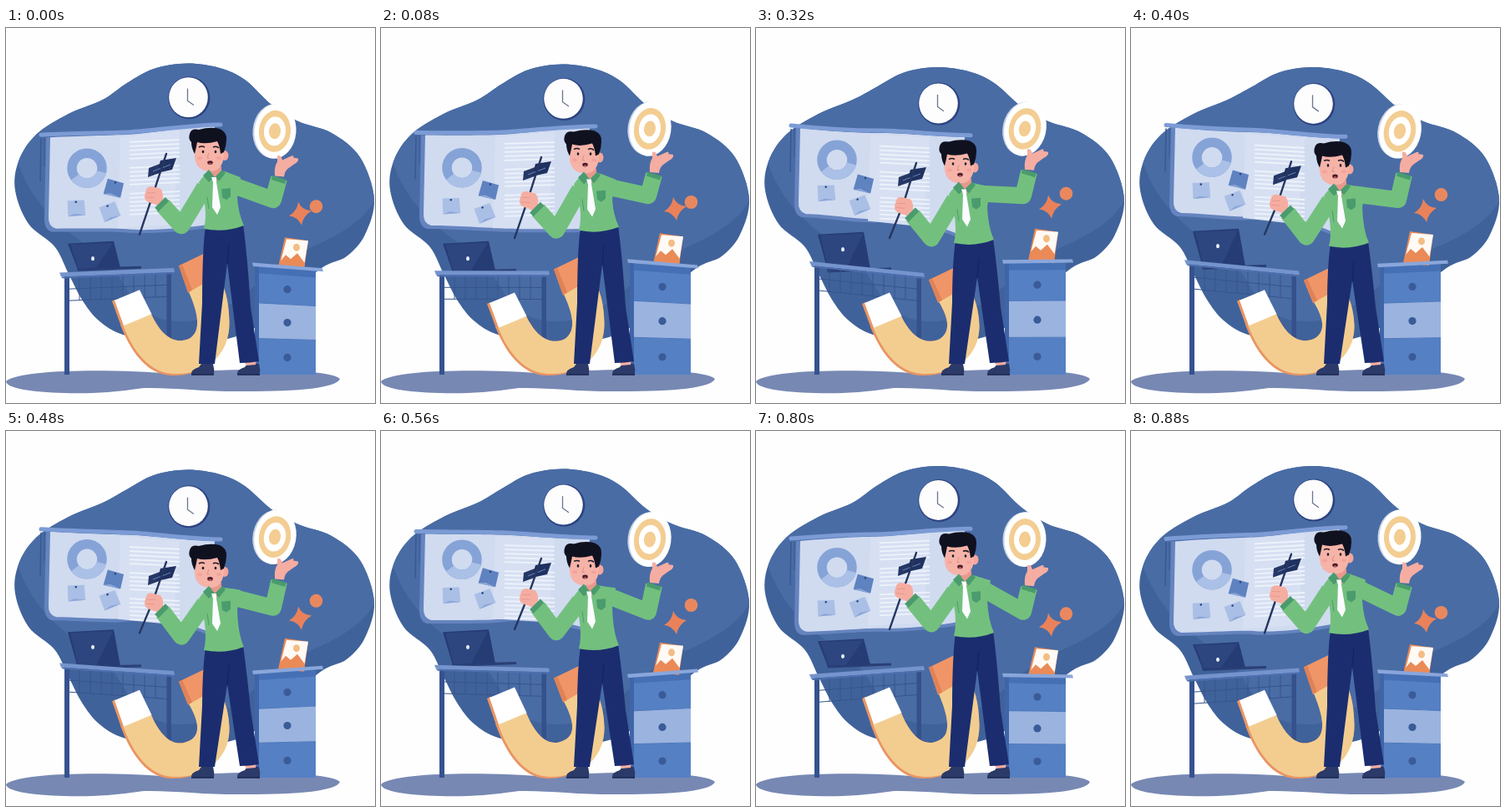
Recreate the animation shown at these times as an HTML page. Size 442x450 px, loop 0.96 s.

```html
<!DOCTYPE html>
<html lang="en">
<head>
<meta charset="utf-8">
<title>Presenter</title>
<style>
html, body { margin: 0; width: 100%; height: 100%; overflow: hidden; background: #fefefe; }
svg { display: block; width: 442px; height: 450px; }
</style>
</head>
<body>
<svg id="stage" viewBox="0 0 442 450" xmlns="http://www.w3.org/2000/svg"></svg>
<script>
const LOOP = 960, STEP = 80;
const stage = document.getElementById('stage');
let now = 0;

// Swing around `mid` that is largest at the time `peak`
const sway = (mid, amp, peak) => mid + amp * Math.cos(2 * Math.PI * (now - peak) / LOOP);
const r = n => Math.round(n * 100) / 100;
const lerp = (a, b, k) => a + (b - a) * k;

const path = (d, fill, extra = '') => `<path d="${d}" fill="${fill}" ${extra}/>`;
const poly = (pts, fill, extra = '') =>
  `<polygon points="${pts.map(p => p.map(r).join()).join(' ')}" fill="${fill}" ${extra}/>`;
const line = (pts, color, width, extra = '') =>
  `<polyline points="${pts.map(p => p.map(r).join()).join(' ')}" fill="none" stroke="${color}" stroke-width="${width}" ${extra}/>`;
const oval = (x, y, rx, ry, fill, extra = '') =>
  `<ellipse cx="${r(x)}" cy="${r(y)}" rx="${rx}" ry="${ry}" fill="${fill}" ${extra}/>`;
const move = (x, y, body, turn = 0) =>
  `<g transform="translate(${r(x)} ${r(y)}) rotate(${r(turn)})">${body}</g>`;
const round = 'stroke-linecap="round" stroke-linejoin="round"';

function smooth(pts) {
  const n = pts.length, at = i => pts[(i + n) % n];
  let d = `M${pts[0].map(r)}`;
  for (let i = 0; i < n; i++) {
    const [a, b, c, e] = [at(i - 1), at(i), at(i + 1), at(i + 2)];
    d += `C${[0, 1].map(k => r(b[k] + (c[k] - a[k]) / 6))} ${[0, 1].map(k => r(c[k] - (e[k] - b[k]) / 6))} ${c.map(r)}`;
  }
  return d + 'Z';
}

function backdrop() {
  const u = sway(0, 2.6, 380);
  const shape = smooth([
    [217, 44.5 + u], [256, 50 + u], [286, 64 + u], [318, 93 + u / 2], [350, 112], [390, 126],
    [424, 155], [441, 205], [430, 248], [408, 274], [378, 288], [335, 325], [298, 360],
    [250, 376], [190, 377], [140, 368], [111, 351], [91, 326], [75, 295], [58, 262],
    [27, 235], [11, 195], [15, 160], [36, 128], [75, 103], [116, 86], [145, 68 + u], [177, 51 + u]]);
  return `<clipPath id="blob"><path d="${shape}"/></clipPath>` +
    path(shape, '#40629a') +
    path('M0 0H442V206C425 238 385 255 350 270S270 350 215 352S150 320 130 290S38 240 12 155L0 150Z',
      '#496ca5', 'clip-path="url(#blob)"');
}

const shadow = () => path('M0 424C16 409 130 409 200 415C260 407 390 408 400 421C396 432 350 436 290 436' +
  'C240 437 200 431 165 432C125 438 95 439 70 438C30 437 0 432 0 424Z', '#7788b3');

function clock() {
  return move(218.5, sway(86.7, 4.2, 390),
    oval(0.8, 0.6, 25, 25.5, '#2c4280') + oval(0, 0, 23.3, 24, '#fdfdfe') +
    line([[-1, -10], [-1, 4], [6, 9]], '#6b7690', 1.3, round));
}

function target() {
  return move(322, sway(125.5, 6.5, 680),
    oval(-1.5, 0, 25, 32.5, '#c9d3e6') + oval(0.5, 0, 25, 33, '#fff') +
    oval(0, 0, 19, 25, '#f3cd92') + oval(0, 0, 13, 17.5, '#fff') + oval(0, 0, 7, 9.5, '#f3cd92'),
    sway(8, 5, 320));
}

function sparkles() {
  return move(353, sway(223.5, 11, 705),
      path('M-3 -14Q1 -4 13 -3Q3 3 1 14Q-4 4 -14 3Q-4 -3 -3 -14Z', '#e9825a')) +
    oval(371.5, sway(209, 10.3, 800), 7.8, 8, '#e9885f');
}

function note(x, y, turn, fill) {
  return move(x, y, poly([[-10, -9], [10, -9], [11, 9], [-10, 10]], fill) +
    poly([[-10, 10], [11, 9], [-2, 7]], '#8ba6d8') + oval(0, -7, 1.3, 1.3, '#2b4680'), turn);
}

function board() {
  const tl = sway(123, 6.5, 860), tr = sway(123, 7.5, 430);
  const tm = sway(123.5, 2.5, 60);
  const bl = sway(232, 10, 880), bm = sway(232, 11, 0), br = sway(238, 9, 270);
  const bend = (y0, y1, y2, x0, x2) =>
    `C${r(lerp(x0, x2, .22))} ${r(lerp(y0, y1, .8))} ${r(lerp(x0, x2, .4))} ${r(y1)} ${r(lerp(x0, x2, .5))} ${r(lerp(y1, (y0 + y2) / 2, .3))}` +
    `S${r(lerp(x0, x2, .85))} ${r(y2)} ${x2} ${r(y2)}`;
  const panel = (x, e) => `M${x} ${r(tl + 3)}` + bend(tl + 3, tm + 3, tr + 2, x, 250) +
    `L240 ${r(br + e)}` + bend(br + e, bm + e, bl + e, 240, x + 7) +
    `Q${x - 3} ${r(bl + e - 3)} ${x - 2} ${r(bl - 15)}Z`;
  let text = '';
  const top = sway(138, 5, 320), slope = (tr - tl) * .12;
  for (const [first, count] of [[0, 5], [31, 5], [62, 6]])
    for (let i = 0; i < count; i++) {
      const y = top + first + i * 5;
      text += line([[148, y - slope], [208, y + slope]], '#eef3fb', 1.8);
    }
  const ring = move(97, sway(161, 7.2, 20),
    `<circle r="18" fill="none" stroke="#86a3d7" stroke-width="11.5"/>` +
    `<circle r="18" fill="none" stroke="#abc0e7" stroke-width="11.5" stroke-dasharray="40 74" transform="rotate(15)"/>`);
  return line([[42, tl + 4], [41, tl + 56]], '#3a5892', 1.5) + line([[46, tl + 4], [46, tl + 38]], '#3a5892', 1) +
    path(panel(48, 4), '#6584bf') + path(panel(53, 0), '#d0dbf0') +
    path(`M137 ${r(tm + 5)}L208 ${r(lerp(tm, tr, .7) + 4)}L200 ${r(lerp(bm, br, .7) - 2)}L134 ${r(lerp(bm, br, .3) - 1)}Z`, '#d7e0f2') +
    text + ring +
    note(84, sway(205, 11, 930), -2, '#aabfe5') +
    note(129, sway(185, 9.5, 110), 16, '#5f82c0') +
    note(124, sway(211.5, 10.5, 90), -20, '#aabfe5') +
    path(`M42 ${r(tl)}` + bend(tl, tm, tr, 42, 257), 'none', 'stroke="#7c9bd5" stroke-width="5" stroke-linecap="round"');
}

function desk() {
  const a = sway(289, 8, 910), b = sway(291, 7, 240);
  const y = x => lerp(a, b, (x - 65) / 136);
  let grid = '';
  for (let x = 88; x < 192; x += 13) grid += line([[x, y(x)], [x, y(x) + 31]], '#36548c', 1);
  for (const h of [17, 31]) grid += line([[76, y(76) + h], [193, y(193) + h]], '#36548c', 1);
  return grid +
    poly([[192.5, b], [198, b], [198, 415], [192.5, 415]], '#35518c') +
    poly([[70, a], [76, a], [76, 416], [70, 416]], '#35528f') +
    poly([[64, a - 3], [201, b - 3], [202, b + 2], [66, a + 2]], '#7594cd') +
    poly([[66, a + 2], [202, b + 2], [200, b + 4], [68, a + 4]], '#4d6fae');
}

function laptop() {
  const y = sway(268, 9, 40), base = sway(285, 7.5, 180);
  return poly([[85, base], [162, base - 2], [162, base + 1], [86, base + 4]], '#2b4077') +
    poly([[74, y - 18], [129, y - 21], [137, base], [86, base + 2]], '#263c74') +
    poly([[77, y - 17], [128, y - 19], [108, base], [87, base + 1]], '#2d4680') +
    oval(104, y, 2, 2.6, '#e8edf8');
}

function magnet() {
  const l = sway(0, 7, 200), g = sway(0, 10, 375), k = l * .75, h = g * .7;
  const u = (x, y) => `M${140 - x} ${r(355 + k)}C${152 - x} ${r(387 + k / 2)} ${172 - x} ${416 + y} ${202 - x} ${416 + y}` +
    `C${240 - x} ${417 + y} 268 392 267.5 ${r(355 + h / 3)}C267 ${r(333 + h)} 262 ${r(313 + h)} 252 ${r(302 + h)}` +
    `L219 ${r(322 + h)}C228 ${r(340 + h / 2)} 236 363 220 ${r(372 + l / 4)}C200 382 184 ${r(365 + k / 2)} 174 ${r(342 + k)}Z`;
  return path(u(3, 1), '#e99562') + path(u(0, -1), '#f3cd90') +
    poly([[127, 326 + l], [131, 324 + l], [143, 355 + k], [138, 357 + k]], '#e99562') +
    poly([[130, 325 + l], [160, 312.5 + l], [174.5, 342 + k], [141, 356 + k]], '#fff') +
    poly([[207, 293 + g], [238, 278 + g], [253, 303 + h], [218, 323 + h]], '#f09567') +
    poly([[207, 293 + g], [211, 291 + g], [223, 320 + h], [218, 323 + h]], '#e08257');
}

function cabinet() {
  const a = sway(287, 9.5, 670), b = sway(287.5, 7.5, 790);
  const y = (x, k) => { const top = lerp(a, b, (x - 296) / 83); return top + (416 - top) * k; };
  const row = (k0, k1, fill) => poly([[303, y(303, k0)], [371, y(371, k0)], [371, y(371, k1)], [303, y(303, k1)]], fill);
  const p = sway(251, 10, 740), base = y(341, 0);
  const picture =
    poly([[334, p - 1], [362, p + 3], [357, base + 2], [326, base - 1]], '#ea8a57') +
    poly([[336, p + 1], [362, p + 3], [357, p + 33], [329, p + 28]], '#fffaf5') +
    poly([[329, p + 27], [335, p + 20], [341, p + 25], [349, p + 18], [358, p + 30], [357, base + 1], [327, base - 2]], '#ea8a57') +
    oval(348, p + 11, 4, 4.5, '#f3bd85');
  return poly([[298, y(298, 0)], [304, y(304, 0)], [304, 417], [298, 416]], '#3f65a9') +
    row(0, .1, '#4570b5') + row(.075, .345, '#5580c4') + row(.345, .67, '#9bb3df') + row(.67, 1, '#5580c4') +
    line([[303, y(303, .345)], [371, y(371, .345)]], '#4e79bd', 1) +
    line([[303, y(303, .67)], [371, y(371, .67)]], '#4e79bd', 1) +
    [.205, .515, .84].map(k => oval(337, y(337, k), 4.6, 4.6, '#3a5b98')).join('') +
    picture +
    poly([[295, a - 2.5], [379, b - 2.5], [380, b + 1.5], [296, a + 2]], '#8aa6db');
}

function pointer(hand) {
  const top = sway(157, 8, 300), end = sway(245, 10, 200);
  return poly([[171, top + 14], [187, top + 8], [184, top + 20], [170, top + 25]], '#253866') +
    poly([[185, top + 5], [204, top + 2], [199, top + 16], [181, top + 20]], '#1f3160') +
    line([[176, top + 18], [197, top + 10]], '#6d83b6', 1) +
    line([[192, top - 3], [176, hand], [160, end]], '#26365f', 2.4, round);
}

function head(y) {
  return move(243, y,
    path('M3 12H15V26Q10 32 3 28Z', '#e9988f') +
    oval(19, -1, 4.5, 6, '#f3a79d') +
    path('M-18 -20L17 -20L18 0Q16 18 1 18Q-15 17 -17 2Z', '#f6b3a8') +
    path('M-23 -27Q-21 -34 -12 -32Q2 -36 13 -33Q22 -29 21 -20Q21 -13 18 -5L14 -3Q13 -13 10 -18Q-4 -14 -14 -17Q-15 -11 -17 -3Q-21 -10 -21 -17Q-25 -21 -23 -27Z', '#10111f') +
    path('M-12 -11Q-8 -13 -5 -11M5 -11Q9 -13 12 -10', 'none', 'stroke="#1b1a28" stroke-width="1.5"') +
    oval(-7, -5.5, 1.3, 1.8, '#1b1a28') + oval(8, -5.5, 1.3, 1.8, '#1b1a28') +
    path('M0 -4L-2 2L1 2', 'none', 'stroke="#dc8f85" stroke-width="1"') +
    oval(-11, 2, 3, 1.8, '#f3a29a') + oval(12, 2, 3, 1.8, '#f3a29a') +
    oval(1.5, 7.5, 3.3, 2.4, '#4b1c2a') + oval(1.5, 8.7, 1.8, .8, '#d0626a'));
}

function man(hand) {
  const n = sway(0, 8.5, 425), hip = sway(258, 11, 470), s = sway(187, 6.5, 400);
  const le = sway(243, 10.5, 310), re = sway(212, 11, 680), rh = sway(162.5, 9, 720);
  const green = '#73c07e', deep = '#4a9b6d', navy = '#1b2d6f', skin = '#f5ada2';
  const neck = 186 + n, sl = 197 + n;
  const wrist = [327, rh + 18];
  const shoe = (x, y) => path(`M${x} ${y + 13}Q${x - 1} ${y + 7} ${x + 9} ${y + 4}L${x + 12} ${y}H${x + 26}Q${x + 28} ${y + 7} ${x + 27} ${y + 13}Z`, '#2b3a68') +
    line([[x, y + 13], [x + 27, y + 13]], '#17244e', 1.5);
  const legs = shoe(222, 403) + shoe(277, 403) +
    poly([[284, 398], [300, 398], [299, 404], [288, 405]], skin) +
    path(`M239 ${r(hip - 10)}L284 ${r(hip - 12)}Q289 ${r(hip + 25)} 293 335L303 400Q292 402 280 402L265 ${r(hip + 35)}L250 403H231L235 330Q235 ${r(hip + 20)} 239 ${r(hip - 10)}Z`, navy) +
    line([[265, hip + 36], [267, hip + 12]], '#15245b', 1.2);
  const leftHand = move(177, hand,
    path('M-9 -6Q-7 -11 0 -9L8 -7Q12 -2 11 5L13 9L7 15Q1 11 -4 10Q-12 8 -11 1Z', skin) +
    path('M-8 -2L2 -2M-9 3L1 4', 'none', 'stroke="#e6978d" stroke-width="1"'));
  const rightHand = move(327, rh,
    path('M-5 15Q-6 4 -2 -2L-2 -9Q2 -11 4 -4L15 -9Q19 -10 17 -7L23 -6Q24 -2 18 1L11 6Q7 9 6 16Z', skin));
  const torso = `M231 ${r(sl - 4)}Q238 ${r(neck - 4)} 247 ${r(neck - 6)}L262 ${r(neck - 6)}Q273 ${r(lerp(neck - 3, s - 4, .5))} 281 ${r(s - 2)}` +
    `L277 ${r(s + 22)}Q278 ${r(hip - 25)} 285 ${r(hip - 10)}Q262 ${r(hip - 1)} 237 ${r(hip - 6)}Q243 ${r(hip - 30)} 231 ${r(sl - 4)}Z`;
  return legs + leftHand +
    line([[188, hand + 13], [210, le - 1], [238, sl + 2]], green, 20, 'stroke-linejoin="round"') +
    line([[184.5, hand + 9.5], [189, hand + 14]], deep, 18) +
    rightHand +
    line([[268, s + 6], [320, re - 3], wrist], green, 20, 'stroke-linejoin="round"') +
    line([[326, wrist[1] + 4], [327.5, wrist[1] - 1]], deep, 17) +
    path(torso, green) +
    line([[241, sl + 14], [243, sl + 28]], deep, 1) +
    path(`M258 ${r(s + 12)}L269 ${r(s + 11)}V${r(s + 21)}L264 ${r(s + 25)}L259 ${r(s + 22)}Z`, deep) +
    head(162 + n) +
    poly([[236, neck - 1], [243, neck - 8], [250, neck + 1], [243, neck + 7]], deep) +
    poly([[250, neck + 1], [259, neck - 8], [263, neck - 4], [255, neck + 6]], deep) +
    poly([[246, neck + 1], [252, neck + 1], [252, neck + 7], [257, neck + 37], [253, neck + 46], [247, neck + 37], [248, neck + 7]], '#fbfcff');
}

function draw() {
  const hand = sway(202, 11, 270);
  stage.innerHTML = backdrop() + shadow() + clock() + target() + sparkles() + board() +
    laptop() + desk() + magnet() + cabinet() + pointer(hand) + man(hand);
}

let last = -1;
function tick() {
  // The small lead keeps rounding from showing the step before
  const step = Math.floor((performance.now() + 1) % LOOP / STEP);
  if (step !== last) {
    last = step;
    now = step * STEP;
    draw();
  }
  requestAnimationFrame(tick);
}
tick();
</script>
</body>
</html>
```
